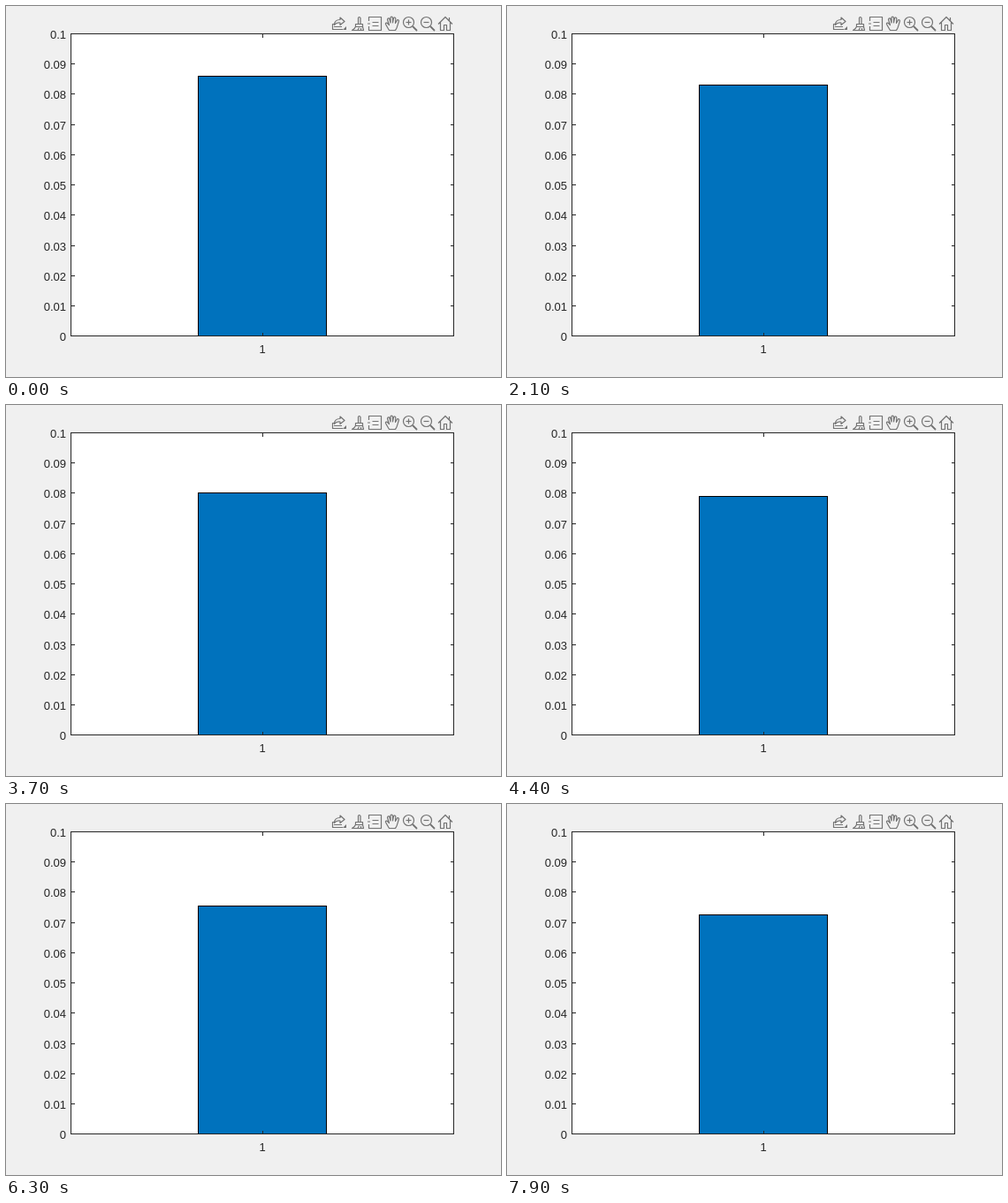
An HTML page for the animation above (8 s loop, 560 px wide and 420 px high).

```html
<!DOCTYPE html>
<html lang="en">
<head>
<meta charset="utf-8">
<title>Bar chart</title>
<style>
  html, body { margin: 0; width: 100%; height: 100%; overflow: hidden; background: #f0f0f0; }
  svg { display: block; width: 560px; height: 420px; }
  text { font: 13px "Liberation Sans", Arial, sans-serif; fill: #262626; }
  .axes { fill: none; stroke: #262626; shape-rendering: crispEdges; }
  .bar { fill: #0072bd; stroke: #000; shape-rendering: crispEdges; }
  .tools { fill: none; stroke: #737373; stroke-width: 1.2; stroke-linejoin: round; }
</style>
</head>
<body>
<svg viewBox="0 0 560 420">
  <rect width="560" height="420" fill="#f0f0f0"/>
  <rect x="73" y="31" width="434" height="343" fill="#fff"/>
  <rect id="bar" class="bar" x="217.5" y="79.5" width="145" height="294"/>
  <path id="axes" class="axes"/>
  <g id="labels" text-anchor="end"></g>
  <text x="290" y="393" text-anchor="middle">1</text>

  <g class="tools">
    <!-- export -->
    <path d="M372 20.5H369.5V26.5H381M371 23.5H380"/>
    <path d="M371.5 21.5C371.5 17.5 374 15.5 378 15.5V13L383 17.5L378 21.5V19C375 18.5 373 19.5 371.5 21.5Z"/>
    <path d="M385 23V27H381Z" fill="#737373" stroke="none"/>
    <!-- brush -->
    <path d="M398.5 20V13.5Q399.5 11.500 401 13.500V20M395.500 20.500H403.500V23.500H395.500Z"/>
    <path d="M395.500 23.500Q394.500 26 391.500 27.500H404.500L403.500 23.500M398 27L399.500 24.500M401.500 27V25"/>
    <!-- data tip -->
    <path d="M410.500 17V12.500H424.500V27.500H410.500V23M409 20H412M414.500 18.500H421.500M414.500 22.500H421.500"/>
    <!-- pan -->
    <path d="M433.500 27.500C432 25 430.500 22.500 429.500 20.500C429 19 431 18.500 432 20L433.500 21.500L431.500 15.500C431.500 13.500 433.500 13.500 434 15L435 19V13.500C435 11.700 437.300 11.700 437.500 13.500V19L438.500 14C439 12.300 441 12.800 440.800 14.500L440.500 19.500L442.200 16.500C443 15 445 15.800 444.300 17.500C443 21 443 24.500 440.500 27.500Z"/>
    <!-- zoom in, zoom out -->
    <g id="lens">
      <circle cx="455.5" cy="18.500" r="6"/>
      <path d="M452.500 18.500H458.500"/>
      <path d="M460 23L465 28" stroke-width="1.8"/>
    </g>
    <use href="#lens" x="20"/>
    <path d="M455.500 15.500V21.500"/>
    <!-- home -->
    <path d="M489 20.500L497 12.500L505 20.500M491.500 18.500V27.500H495.500V21.500H498.500V27.500H502.500V18.500M501.500 16.500V13"/>
  </g>
</svg>
<script>
  const LEFT = 73.5, RIGHT = 506.5, TOP = 31.5, BOTTOM = 373.5, MID = 290.5;
  const LOOP = 8000, START_Y = 79.5;
  const bar = document.getElementById('bar');
  const labels = document.getElementById('labels');

  let path = `M${LEFT} ${TOP}H${RIGHT}V${BOTTOM}H${LEFT}ZM${MID} ${TOP}v4M${MID} ${BOTTOM}v-4`;
  for (let i = 0; i <= 10; i++) {
    const y = Math.floor(373.8 - i * 34.23) + 0.5;
    path += `M${LEFT} ${y}h4M${RIGHT} ${y}h-4`;
    const label = document.createElementNS('http://www.w3.org/2000/svg', 'text');
    label.setAttribute('x', 68);
    label.setAttribute('y', y + 5.5);
    label.textContent = String(i / 100);
    labels.append(label);
  }
  document.getElementById('axes').setAttribute('d', path);

  // The bar drops 1 px every 160 ms, shown on a 100 ms clock.
  function draw(now) {
    const tick = Math.floor((now % LOOP) / 100);
    const drop = Math.max(0, Math.ceil((tick - 6.5) / 1.6));
    const y = START_Y + drop;
    bar.setAttribute('y', y);
    bar.setAttribute('height', BOTTOM - y);
  }

  const start = performance.now();
  function frame() {
    draw(performance.now() - start);
    requestAnimationFrame(frame);
  }
  frame();
</script>
</body>
</html>
```
